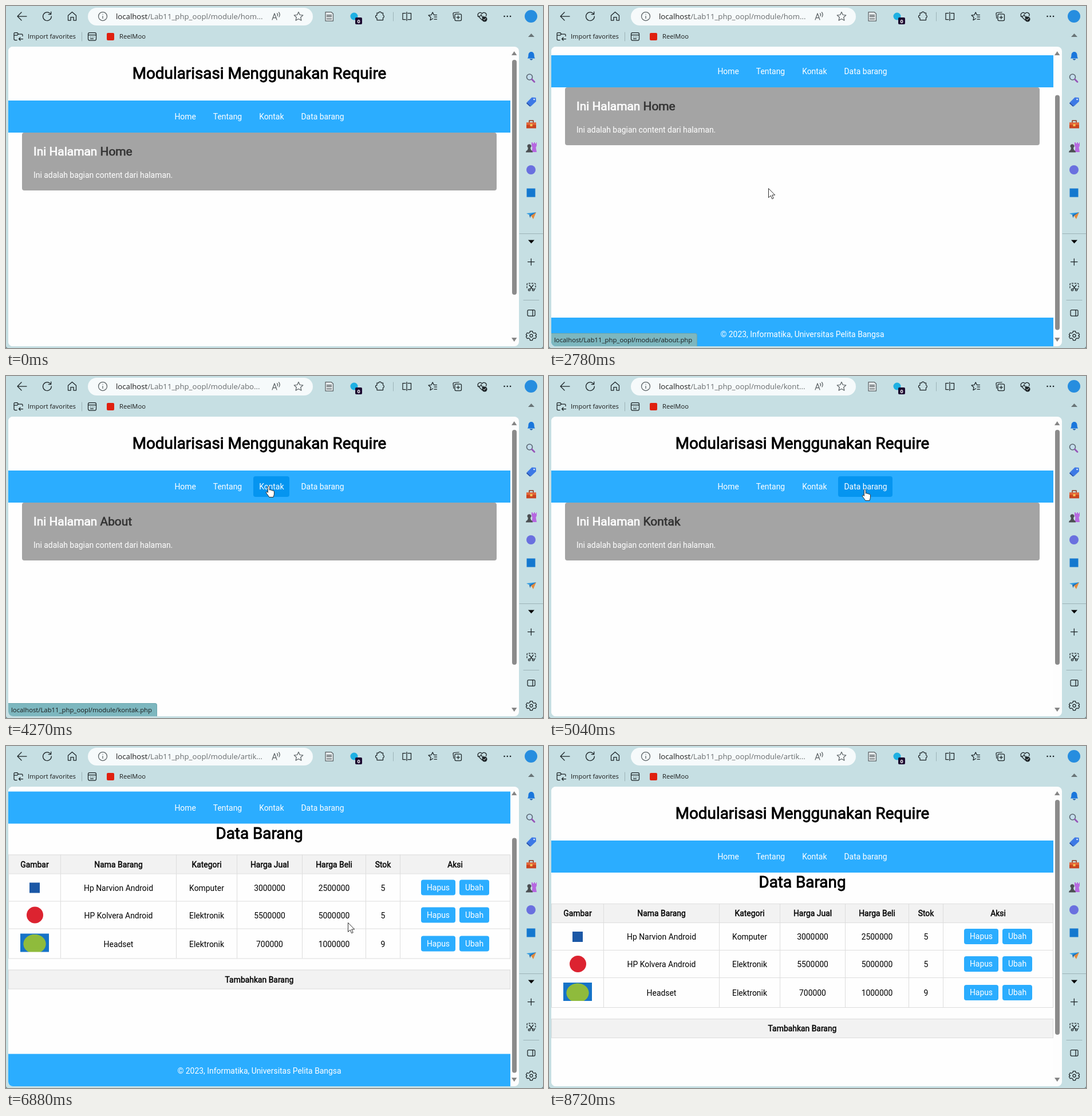
Animation of 938 by 597 pixels, one loop 9480 ms. Source, as an HTML page:

```html
<!DOCTYPE html>
<html lang="id">
<head>
<meta charset="utf-8">
<title>Modularisasi Menggunakan Require</title>
<style>
@property --y { syntax: "<number>"; inherits: true; initial-value: 0; }

html, body { margin: 0; width: 100%; height: 100%; overflow: hidden; background: #5d7c80; }
.stage {
  --url: "hom..."; --name: "Home"; --link: "home"; --tip: 0; --box: 1; --tab: 0;
  --hand: 0; --hx: 280px; --hw: 57px;
  position: relative; width: 938px; height: 597px; overflow: hidden;
  border-radius: 0 0 4px 4px; background: #c6dfe3; color: #000;
  font: 13.92px/20px Roboto, sans-serif;
  animation: page 9480ms step-end infinite, hover 9480ms step-end infinite, scroll 9480ms infinite;
}
.stage * { box-sizing: border-box; }
.chrome, .cursor { position: absolute; left: 0; top: 0; }
.ui { position: absolute; white-space: pre; font-family: "Open Sans", "Noto Sans", sans-serif; color: #1b1b1b; }
.url { left: 192px; top: 8px; font-size: 13.2px; }
.url i { font-style: normal; color: #686c6e; }
.url i::after { content: var(--url); }
.fav { top: 43px; font-size: 11.2px; }

.view { position: absolute; left: 4px; top: 71px; width: 892px; height: 523px; overflow: hidden; border-radius: 8px; background: #fdfdfd; }
.doc { position: absolute; width: 877px; height: 609px; background: #fefefe; transform: translateY(calc(var(--y) * -85.5px)); }
.doc > * { position: absolute; margin: 0; }
h1, h2, .th { font-weight: 400; -webkit-text-stroke: .032em; }
h1 { left: 0; width: 877px; text-align: center; font-size: 27.84px; line-height: 34px; }
nav, footer { left: 0; width: 877px; background: #2badff; color: #fff; display: flex; justify-content: center; align-items: center; }
nav { top: 93.7px; height: 56.3px; gap: 10px; }
nav a { position: relative; padding: 0 10px; }
nav::before { content: ""; position: absolute; left: var(--hx); width: var(--hw); top: 10px; height: 36.5px; border-radius: 4px; background: #0595f0; opacity: var(--hand); }
footer { top: 552px; height: 57px; }
.card { left: 24px; top: 150px; width: 828.5px; height: 101px; border-radius: 4px; background: #a4a4a4; color: #fff; opacity: var(--box); }
.card > * { position: absolute; left: 20px; margin: 0; white-space: pre; }
h2 { top: 19px; font-size: 20.88px; line-height: 28px; }
h2 b { font-weight: 400; color: #333; }
h2 b::after { content: var(--name); }
.card p { top: 63.5px; }
.goods { inset: 0; opacity: var(--tab); }
.goods > * { position: absolute; }
.grid {
  top: 204px; width: 877px; display: grid;
  grid: 33px 48px 48px 52px / 91px 202px 106px 114px 111px 60px 192px;
  border: solid #ddd; border-width: 0 1px 1px 0;
}
.grid > * { border: solid #ddd; border-width: 1px 0 0 1px; display: flex; justify-content: center; align-items: center; gap: 7px; }
.th { background: #f2f2f2; }
.add { top: 405px; width: 877px; height: 34px; border: 1px solid #ddd; line-height: 32px; text-align: center; }
.grid a { padding: 0 10px; line-height: 27px; border-radius: 4px; background: #2badff; color: #fff; }
.pic { position: relative; overflow: hidden; }
.sq { width: 18px; height: 18px; background: #1b58a6; }
.dot { width: 29px; height: 29px; border-radius: 50%; background: #dc2330; }
.photo { width: 50px; height: 32px; margin-top: -3px; background: radial-gradient(ellipse 20px 17px at 25px 18px, #8fbb3c 96%, #1673c8 100%); }
.thumb { position: absolute; left: 879.5px; top: 23px; width: 8.5px; height: 410px; border-radius: 4.5px; background: #8b8b8b; transform: translateY(calc(var(--y) * 66.5px)); }
.bars { position: absolute; left: 0; top: 0; }
.tip { left: 4px; bottom: 3px; padding: 0 8px 0 5px; font-size: 11.3px; line-height: 22px; height: 23px; background: #7db7bf; border: solid #6ba5ad; border-width: 1px 1px 0 0; border-radius: 0 4px 0 8px; opacity: var(--tip); }
.tip::after { content: "localhost/Lab11_php_oopl/module/" var(--link) ".php"; }
.cursor { overflow: visible; animation: move 9480ms ease-in-out infinite; }
.arrow { opacity: calc(1 - var(--hand)); }
.hand { opacity: var(--hand); }

@keyframes page {
  13.08% { --tip: 1; }
  15.93% { --tip: 0; }
  24.58% { --tip: 1; --link: "about"; }
  31.12% { --tip: 0; }
  36.9% { --tip: 1; }
  39.03% { --tip: 0; --url: "abo..."; --name: "About"; }
  44.3% { --tip: 1; --link: "kontak"; }
  48.52% { --tip: 0; --url: "kont..."; --name: "Kontak"; }
  53.8% { --tip: 1; --link: "artikel"; }
  56.33% { --url: "artik..."; --box: 0; }
  57.38% { --tip: 0; --tab: 1; }
}
@keyframes hover {
  10.97% { --hand: 1; }
  18.9% { --hand: 0; }
  22.8% { --hand: 1; --hx: 348px; --hw: 71px; }
  25.3% { --hand: 0; }
  37% { --hand: 1; }
  42.3% { --hand: 0; }
  42.8% { --hand: 1; --hx: 428px; --hw: 63px; }
  51% { --hand: 0; }
  51.3% { --hand: 1; --hx: 501px; --hw: 95px; }
  57.7% { --hand: 0; }
}
@keyframes scroll {
  0%, 27.22% { --y: 0; animation-timing-function: ease-out; }
  29.3% { --y: .924; }
  29.85% { --y: .93; }
  30.4%, 32.2% { --y: 1; animation-timing-function: ease-out; }
  34.2%, 59.7% { --y: 0; animation-timing-function: ease-out; }
  62.5%, 73.6% { --y: 1; animation-timing-function: ease-out; }
  76%, 100% { --y: 0; }
}
@keyframes move {
  0%, 4.42% { visibility: hidden; transform: translate(665px, 532px); }
  4.43% { visibility: visible; transform: translate(665px, 532px); }
  11.5%, 18.57% { transform: translate(322px, 204px); }
  19.6% { transform: translate(340px, 208px); }
  20.57%, 22.47% { transform: translate(346px, 203px); }
  23%, 24.58% { transform: translate(385px, 202px); }
  29.3%, 29.85% { transform: translate(383px, 318px); }
  34.28% { transform: translate(610px, 400px); }
  37.45%, 40.6% { transform: translate(397px, 200px); }
  44.4% { transform: translate(454px, 192px); }
  45%, 49.58% { transform: translate(459px, 192px); }
  52.74%, 57.38% { transform: translate(552px, 198px); }
  58.9%, 59.7% { transform: translate(584px, 271px); }
  63%, 69.3% { transform: translate(583px, 290px); }
  69.41%, 71.52% { transform: translate(583px, 295px); }
  72.5%, 73.1% { transform: translate(597px, 308px); }
  80.7%, 83.33% { transform: translate(654px, 277px); }
  91.7% { visibility: visible; transform: translate(893px, 590px); }
  91.71%, 100% { visibility: hidden; transform: translate(893px, 590px); }
}
</style>
</head>
<body>
<div class="stage">
  <svg class="chrome" width="938" height="597" fill="none" stroke="#1c2427" stroke-width="1.25" stroke-linecap="round" stroke-linejoin="round">
    <defs><path id="star" d="M0-8l2.3 5 5.5.6-4.1 3.7 1.2 5.4L0 4-4.9 6.7-3.7 1.3-7.8-2.4-2.3-3z"/></defs>
    <rect x="143" y="3" width="393" height="31" rx="15.5" fill="#f6fafb" stroke="none"/>
    <!-- toolbar -->
    <path d="M36 18H21M27 11l-7 7 7 7"/>
    <path d="M78 14a7.4 7.4 0 1 0 1.3 4M78.7 10v4.5h-4.5"/>
    <path d="M108.500 16.500l7-6 7 6v8.500h-4.500v-5.500h-5v5.500h-4.500z"/>
    <g stroke="#5b6265">
      <circle cx="169" cy="18" r="7.5"/><path d="M169 17.500v4M169 14.400v.1"/>
      <path d="M465 24l4-11 4 11M466.500 20.500h5M473.500 13q2 2 .5 4.500M476.500 11q3 3.500 .5 8"/>
      <use href="#star" x="511" y="18.500"/>
      <path d="M558 10.500h10l3.500 3v12.500H558z" fill="#e6ecee"/>
      <path d="M560.500 16h8M560.500 18.500h8M560.500 22.500h8" stroke-width="1.500"/>
    </g>
    <circle cx="608" cy="18" r="6.500" fill="#1fb0e2" stroke="none"/>
    <rect x="610" y="20" width="12" height="12" rx="2" fill="#1d0930" stroke="none"/>
    <path d="M649 12h2a2.300 2.300 0 0 1 4.500 0h3v4a2.300 2.300 0 0 1 0 4.500v4h-10.500v-3.500a2.300 2.300 0 0 1 0-5v-4z"/>
    <path d="M676.500 11v15M132.500 46v15" stroke="#9db3b7" stroke-width="1"/>
    <path d="M698 12.500h-5v11h5M702 12.500h5.500v11H702M700 10.500v15"/>
    <path d="M745.500 22l-4.500 2.700 1-5-4-3.500 5-.600 2.200-4.600 2.200 4.600h5M748 19h4.500M748 23h4.500"/>
    <rect x="784" y="14" width="11.500" height="11.500" rx="2"/><path d="M782 21.500l-1-8q0-2 2-2l8-.500M789.800 17v5.500M787 19.800h5.500"/>
    <path d="M831.500 24.500l-6.500-6.500c-3-5 3.500-9 6.500-4.500 3-4.500 9.500-.500 7 4M824 18h4l2-3 2.500 5.500 1.500-2.500"/>
    <circle cx="836" cy="23" r="4.500" fill="#1c2427" stroke="none"/><path d="M834 23l1.500 1.500 2.500-3" stroke="#fff" stroke-width="1"/>
    <path d="M870.500 18h.1M875.700 18h.1M881 18h.1" stroke-width="2.500"/>
    <!-- favorites bar -->
    <path d="M19 59.500h-3q-2 0-2-2V48q0-1.500 1.500-1.500h4l2 2.500h6q1.500 0 1.500 1.500v2M14 51h5.500l2-2M29.500 57.500h-7M25 55l-2.500 2.500 2.500 2.500"/>
    <rect x="143.500" y="46.500" width="14" height="13.500" rx="2.500"/><path d="M144 50.500h13M147.500 54h.1M150.500 54h.1M153.500 54h.1M147.500 57h5"/>
    <rect x="176" y="47" width="13" height="13" rx="2" fill="#e0200f" stroke="none"/>
    <!-- sidebar -->
    <g stroke="none">
      <circle cx="917" cy="18" r="11" fill="#268ddf"/>
      <path d="M912 54l5.500-6 5.500 6z" fill="#697477"/>
      <path d="M911 91.500q1.500-2 1.500-6c0-7.500 10-7.500 10 0q0 4 1.500 6z" fill="#1976dc"/><path d="M914.500 92.500h6q-3 4-6 0" fill="#0d4fa3"/>
      <path d="M910 168l8.500-8.500 7 .5.500 6.500-9 8.500z" fill="#3d79e6"/><path d="M910 168l7 7-2 .5-6-5.500z" fill="#214fae"/><circle cx="922.500" cy="163" r="1.200" fill="#fff"/>
      <path d="M909 203.500h17v10h-17z" fill="#c9431f"/><path d="M909 203.500h17v4h-17z" fill="#e5673a"/><path d="M915.500 206h4v4h-4z" fill="#f6c052"/>
      <path d="M918 255l1.500-8-1.500-3v-6h2v2h2v-2h2v2h2v-2h1v6l-1.500 3 1.500 8z" fill="#b668e0"/>
      <path d="M908 255.500q0-3 3-4l1-4a3.500 3.500 0 1 1 4 0l1 4q3 1 3 4z" fill="#4b4f52"/>
      <circle cx="917" cy="286" r="8" fill="#6a70df"/>
      <rect x="909.500" y="318.500" width="15" height="15" fill="#1478cf"/>
      <path d="M909 362l17-2-9 6z" fill="#2f9be2"/><path d="M926 360l-5 12-4-6z" fill="#e58a3b"/><path d="M914 365l12-5-9 6-1.500 4z" fill="#1d69ad"/>
      <path d="M912 408.500h11l-5.500 6z" fill="#000"/>
    </g>
    <circle cx="914.500" cy="124" r="5" fill="#c3ddec" stroke="#5a6771" stroke-width="1.600"/><path d="M918.500 128l4.500 4.500" stroke="#9654b8" stroke-width="2.800"/>
    <path d="M914 203v-3h7v3" stroke="#8e3016" stroke-width="1.500"/>
    <path d="M897 397.500h41M904 513.500h27" stroke="#9db3b7" stroke-width="1"/>
    <path d="M911.500 446.500h11.500M917.300 441v11.500"/>
    <path d="M910 492v-6q0-2 2-2h11q2 0 2 2v6q0 2-2 2" stroke-dasharray="2.500 2.500"/>
    <path d="M914 487l5.500 7M921 487l-5.500 7"/><circle cx="914" cy="495.500" r="1.700"/><circle cx="921" cy="495.500" r="1.700"/>
    <rect x="911" y="530.500" width="13" height="10.500" rx="2"/><path d="M920 530.500v10.500"/>
    <path d="M915.500 567.500h4l.600 2.500 2.200 1.200 2.400-.700 1.900 3.300-1.800 1.700 1.800 1.700-1.900 3.300-2.400-.700-2.200 1.200-.600 2.500h-4l-.600-2.500-2.200-1.200-2.400.700-1.900-3.300 1.800-1.700-1.800-1.700 1.900-3.300 2.400.700 2.200-1.200z"/><circle cx="917.500" cy="575.500" r="2.500"/>
    <text x="616" y="29.500" text-anchor="middle" fill="#fff" stroke="none" font-family="Open Sans, sans-serif" font-size="9" font-weight="700">0</text>
  </svg>
  <div class="ui url">localhost<i>/Lab11_php_oopl/module/</i></div>
  <div class="ui fav" style="left:38px">Import favorites</div>
  <div class="ui fav" style="left:198px">ReelMoo</div>

  <div class="view">
    <div class="doc">
      <h1 style="top:30px">Modularisasi Menggunakan Require</h1>
      <nav><a>Home</a><a>Tentang</a><a>Kontak</a><a>Data barang</a></nav>
      <div class="card"><h2>Ini Halaman <b></b></h2><p>Ini adalah bagian content dari halaman.</p></div>
      <div class="goods">
        <h1 style="top:150px;margin:0">Data Barang</h1>
        <div class="grid"></div>
        <div class="add th">Tambahkan Barang</div>
      </div>
      <footer>© 2023, Informatika, Universitas Pelita Bangsa</footer>
    </div>
    <div class="thumb"></div>
    <svg class="bars" width="892" height="523" fill="#858585"><path d="M879 15l4.700-7 4.700 7zM879 508h9.400l-4.700 7z"/></svg>
  </div>
  <div class="ui tip"></div>

  <svg class="cursor" width="1" height="1" fill="#fff" stroke="#1a1a1a" stroke-width=".9" stroke-linejoin="round">
    <path class="arrow" d="M.5.5v16l3.700-3.500 2.500 5.700 2.500-1.100-2.500-5.600h5z"/>
    <path class="hand" transform="translate(-6 -1.500)" d="M5.500 1.500c1.100 0 1.700.8 1.700 2v5.200c.4-1 2.800-1 2.900.5.700-.9 2.700-.6 2.700.9.800-.8 2.600-.4 2.600 1.400v4c0 2-1.200 3-1.400 5.500H6.600c-.6-2-4-5.500-5-7.500-.9-1.700 1-2.800 2.200-1.400l.6.900V3.500c0-1.200.2-2 1.100-2z"/>
  </svg>
</div>
<script>
const heads = ["Gambar", "Nama Barang", "Kategori", "Harga Jual", "Harga Beli", "Stok", "Aksi"];
const goods = [
  ["sq", "Hp Narvion Android", "Komputer", 3000000, 2500000, 5],
  ["dot", "HP Kolvera Android", "Elektronik", 5500000, 5000000, 5],
  ["photo", "Headset", "Elektronik", 700000, 1000000, 9]
];
const cell = (html, cls = "td") => `<div class="${cls}">${html}</div>`;
const row = ([pic, ...cols]) =>
  cell(`<span class="pic ${pic}"></span>`) +
  cols.map(c => cell(c)).join("") +
  cell("<a>Hapus</a><a>Ubah</a>");
document.querySelector(".grid").innerHTML =
  heads.map(h => cell(h, "th")).join("") + goods.map(row).join("");
</script>
</body>
</html>
```
